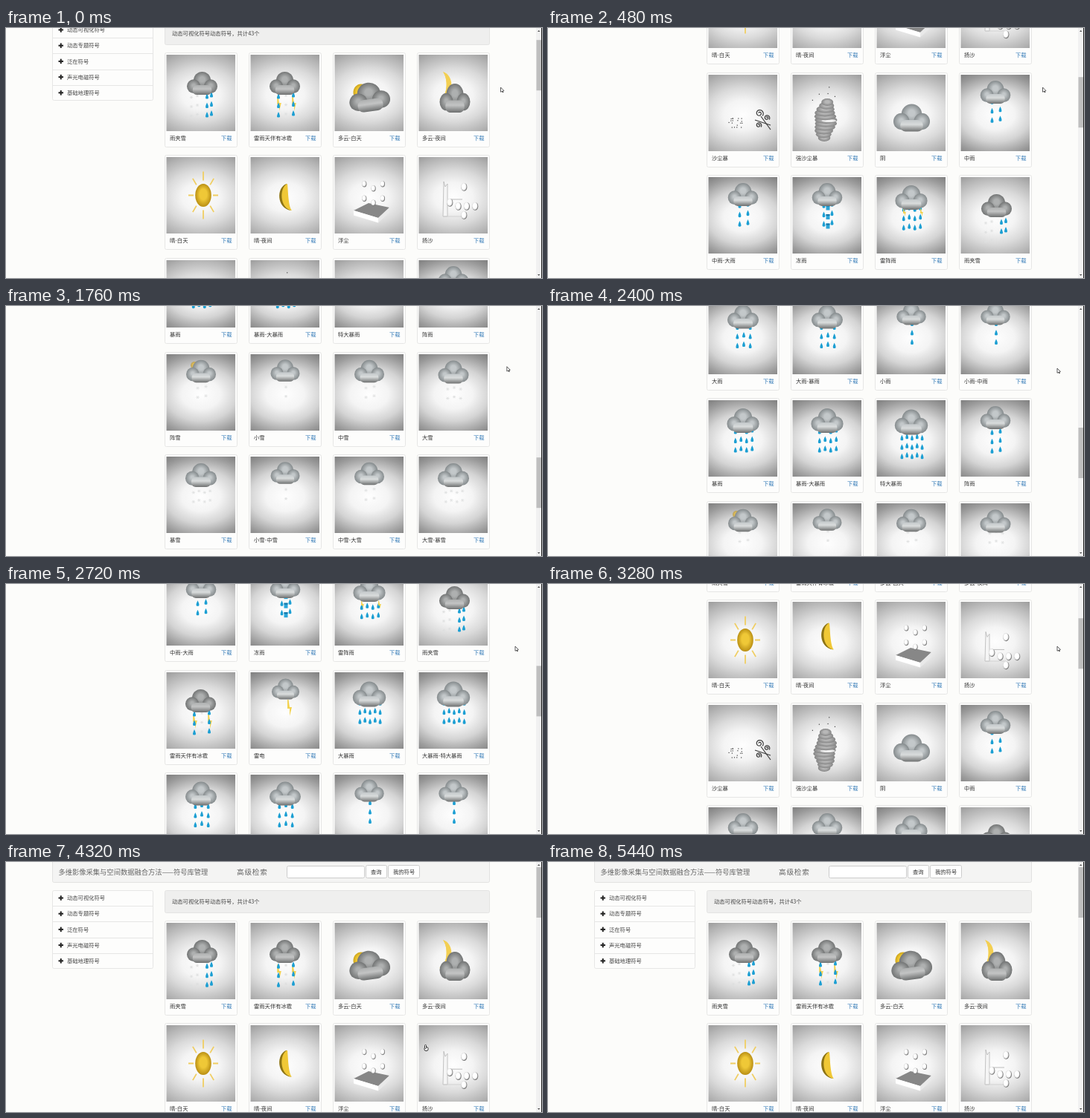
An HTML page with a canvas that plays this animation: 720x337 px, repeating every 5.52 s.

```html
<!DOCTYPE html>
<html lang="zh-CN">
<head>
<meta charset="utf-8">
<title>符号库管理</title>
<style>
  html, body { margin: 0; width: 100%; height: 100%; overflow: hidden; background: #fcfcfa; }
  canvas { display: block; }
</style>
</head>
<body>
<canvas id="stage" width="720" height="337"></canvas>
<script>
const ctx = document.getElementById('stage').getContext('2d');
const LOOP = 5520, TICK = 80, CYCLE = 1360;
const DROP_GAP = 12.5, COLUMN = 113, ROW = 138.4;
const FONT = '"Noto Sans CJK SC", "Noto Sans CJK", sans-serif';
// time, value(s)
const SCROLL = [[0, 46], [160, 148], [1040, 555], [1600, 986], [2160, 986],
  [2720, 517], [3280, 196], [3840, 0]];
const MOUSE = [[0, 664.5, 80], [1520, 664.5, 80], [2080, 684, 84], [4000, 684, 84],
  [4320, 561, 246], [4800, 540, 350]];
let now = 0;

// ---- helpers ----
function track(keys, item = 1) {
  const i = keys.findIndex(k => k[0] > now);
  if (i < 0) return keys.at(-1)[item];
  const a = keys[i - 1], b = keys[i];
  return a[item] + (b[item] - a[item]) * (now - a[0]) / (b[0] - a[0]);
}
const wave = () => Math.sin(Math.PI * now / CYCLE) ** 2;
const noise = n => Math.abs(Math.sin(n * 12.99) * 43758.5) % 1;
const repeat = (n, draw) => { for (let i = 0; i < n; i++) draw(i); };

function text(str, x, y, size = 7.3, color = '#444') {
  ctx.font = `${size}px ${FONT}`;
  ctx.fillStyle = color;
  ctx.fillText(str, x, y);
}
function box(x, y, w, h, fill, stroke, radius = 2) {
  ctx.beginPath();
  ctx.roundRect(x + .5, y + .5, w - 1, h - 1, radius);
  ctx.fillStyle = fill;
  ctx.fill();
  ctx.lineWidth = 1;
  ctx.strokeStyle = stroke;
  ctx.stroke();
}
function poly(points, fill, stroke) {
  ctx.beginPath();
  points.forEach(([x, y]) => ctx.lineTo(x, y));
  ctx.closePath();
  ctx.fillStyle = fill;
  ctx.fill();
  if (stroke) {
    ctx.strokeStyle = stroke;
    ctx.lineWidth = .8;
    ctx.stroke();
  }
}
function line(x1, y1, x2, y2, color, width) {
  ctx.beginPath();
  ctx.moveTo(x1, y1);
  ctx.lineTo(x2, y2);
  ctx.strokeStyle = color;
  ctx.lineWidth = width;
  ctx.stroke();
}
function ball(x, y, rx, ry, light, dark, mid = .45) {
  ctx.save();
  ctx.translate(x, y);
  ctx.scale(rx, ry);
  const g = ctx.createRadialGradient(0, -.15, 0, 0, 0, 1);
  g.addColorStop(mid, light);
  g.addColorStop(1, dark);
  ctx.fillStyle = g;
  ctx.beginPath();
  ctx.arc(0, 0, 1, 0, 7);
  ctx.fill();
  ctx.restore();
}

// ---- weather parts, in picture coordinates ----
function cloud(x, y, w, dark, h = w, tilt = 0) {
  const [light, edge, front] = dark ? ['#aeb0b0', '#737575', '#c3c4c4'] : ['#c3c8ca', '#858b8d', '#d9dcdc'];
  ctx.save();
  ctx.translate(x, y);
  ctx.rotate(tilt);
  ctx.scale(w, h);
  ball(0, -.1, .28, .28, light, edge, .3);
  ball(-.28, .1, .22, .23, light, edge, .2);
  ball(.28, .1, .22, .23, light, edge, .2);
  const g = ctx.createLinearGradient(0, .06, 0, .38);
  g.addColorStop(0, light);
  g.addColorStop(.4, front);
  g.addColorStop(1, '#6e7070');
  ctx.fillStyle = g;
  ctx.beginPath();
  ctx.roundRect(-.31, .06, .62, .32, .14);
  ctx.fill();
  ctx.restore();
}
function drop(x, y) {
  ctx.fillStyle = '#1c9fd3';
  ctx.beginPath();
  ctx.moveTo(x, y - 4);
  ctx.quadraticCurveTo(x + 4, y + 4, x, y + 3.6);
  ctx.quadraticCurveTo(x - 4, y + 4, x, y - 4);
  ctx.fill();
}
function flake(x, y) {
  repeat(3, i => {
    const dx = 2.2 * Math.cos(i * Math.PI / 3), dy = 2.2 * Math.sin(i * Math.PI / 3);
    line(x - dx, y - dy, x + dx, y + dy, '#dfe0e0', .8);
  });
}
function ice(x, y) {
  ctx.fillStyle = '#2aa5d8';
  ctx.fillRect(x - 2.5, y - 3.5, 5, 7);
  ctx.fillStyle = '#1676a8';
  ctx.fillRect(x - 2.5, y - 3.5, 5, 2);
}
function bolt(x, y, h) {
  const w = h * .1 + .8;
  poly([[x - w, y - h / 2], [x - w / 2, y - h / 2], [x, y - 1], [x + w, y - 1],
    [x, y + h / 2], [x, y + 1], [x - w, y + 1]], '#f3d250');
}
function fall(part, xs, top, phase, rows = 3) {
  const f = (phase + now / CYCLE) % 1;
  xs.forEach((x, i) => repeat(rows, k => part(x, top + (k + f) * DROP_GAP - i % 2 * 2)));
}
function crescent(x, y, h, bulge, inner, tip, color) {
  ctx.beginPath();
  ctx.moveTo(x, y);
  ctx.bezierCurveTo(x + bulge, y + h * .12, x + bulge, y + h * .92, x + tip, y + h);
  ctx.bezierCurveTo(x + inner, y + h * .85, x + inner, y + h * .25, x, y);
  ctx.fillStyle = color;
  ctx.fill();
}
function pearl(x, y, r) {
  ball(x + .4, y + .4, r, r * 1.35, '#999', '#777');
  ball(x - .2, y - .2, r - .3, r * 1.35 - .3, '#fff', '#e2e2e2', .6);
}
function specks(n, x, y, w, h) {
  ctx.fillStyle = '#444';
  repeat(n, i => ctx.fillRect(x + w * noise(i + 1), y + h * noise(i + 40), 1.2, 1.2));
}

// ---- pictures ----
const columns = n => Array.from({ length: n }, (_, i) => 47 + (i - (n - 1) / 2) * (4 + 14 / n));

// More columns of drops come with a larger, lower cloud.
const rain = (n, phase, extra) => () => {
  const y = 19.5 + 2 * n, w = 38 + 1.3 * n;
  fall(drop, columns(n), y + w * .38 - 6.5, phase);
  if (extra) extra();
  cloud(46, y, w);
};
const snow = (n, extra) => () => {
  const y = 21 + n, w = 38 + n;
  fall(flake, columns(n), y + w * .38, .3, 2);
  if (extra) extra();
  cloud(46, y, w);
};
const freezing = () => fall(ice, [47], 36, .05);
const flashes = () => [37, 60].forEach(x => bolt(x, 48, 11));
const hiddenSun = () => ball(37, 15, 5, 5, '#dfbd55', '#b8a060');

function sleet() {
  fall(flake, [33, 41], 50, .6);
  fall(drop, [54, 60], 46, .8);
  cloud(47.5, 38.5, 41, true);
}
function hail() {
  fall(flake, [47], 50, .4);
  [38, 58].forEach(x => bolt(x, 66, 20));
  fall(drop, [37, 57], 46, .8);
  cloud(45.5, 38.5, 41, true);
}
function cloudyDay() {
  ball(35, 51, 10.5, 11.5, '#f0c832', '#cda51c', .6);
  cloud(46, 57, 55, true, 51, -.14);
}
function cloudyNight() {
  crescent(32, 23, 38, 13, 7, -5, '#f3cf52');
  crescent(32, 23, 38, 16, 7, -5, '#f3cf52');
  cloud(48, 58.5, 41, true, 51);
}
function sun() {
  repeat(8, i => {
    const c = Math.cos(i * Math.PI / 4), s = Math.sin(i * Math.PI / 4);
    line(49 + c * 13, 51.5 + s * 20, 49 + c * 20, 51.5 + s * 32, '#f0ce62', 1.8);
  });
  ball(49, 51.5, 10.8, 15.6, '#efc837', '#b98f14');
}
function moon() {
  const y = 36 - 8 * wave();
  crescent(48, y, 36, -14, -2, 6, '#8d7415');
  crescent(49, y, 36, -11, 1, 6, '#f0c836');
}
function dust() {
  const back = [45, 62], left = [25, 72], front = [58, 82], right = [73, 68];
  const below = ([x, y]) => [x, y + 6.5];
  poly([left, back, right, front], '#878787');
  poly([left, front, below(front), below(left)], '#fff');
  poly([front, right, below(right), below(front)], '#e9e9e9');
  repeat(6, i => pearl(39 + i % 3 * 12.3, 36 + (i > 2) * 19.5 + (i % 3 === 1) * 6 - wave(), 3));
}
function blowingSand() {
  const y = 8 * wave();
  poly([[33, 33 + y], [35, 40 + y], [38, 36 + y], [38, 80], [32, 80]], '#f5f5f5', '#b5b5b5');
  line(32, 80, 60, 80, '#d2d2d2', 1);
  line(40, 57 + y, 58, 57 + y, '#bbb', 1);
  [40, 78].forEach(py => pearl(60, py + y, 4));
  repeat(4, i => pearl(41 + i * 11.3, (i ? 66 : 61) + y, 4));
}
function spiral(x, y, r) {
  ctx.beginPath();
  for (let a = 0; a < 10; a += .3) {
    const d = r * (1 - a / 12);
    ctx.lineTo(x + d * Math.cos(.7 - a), y + d * Math.sin(.7 - a));
  }
  ctx.strokeStyle = '#3b3b3b';
  ctx.lineWidth = 1.2;
  ctx.stroke();
}
function sandstorm() {
  specks(18, 26, 58, 20, 14);
  spiral(68, 52, 5.5);
  spiral(78, 58, 4);
  spiral(67, 68, 4);
  line(70, 56, 83, 74, '#3b3b3b', 1.2);
  line(62, 61, 83, 68, '#3b3b3b', 1.2);
}
function tornado() {
  repeat(11, k => {
    const i = 10 - k, w = 8 + 7 * Math.sin(i * .31);
    const x = 45 + Math.sin(i * 1.1 + now / 300) * 1.2 - i * .3;
    ball(x, 37 + i * 4.8, w, 5, '#b8b8b8', '#858585', .35);
    if (i === 5) ball(x + 4, 62, 10, 2, '#f4f4f4', '#ddd');
  });
  specks(5, 25, 15, 35, 45);
}
function lightning() {
  if (now % CYCLE < CYCLE / 2) bolt(52, 48, 22);
  else {
    line(44, 40, 43.5, 62, '#f1e7c0', 1.5);
    bolt(45.5, 67, 26);
  }
  cloud(46.5, 22.5, 37);
}
const overcast = () => cloud(46.5, 58, 49);

const CARDS = [
  ['雨夹雪', sleet], ['雷雨天伴有冰雹', hail], ['多云-白天', cloudyDay], ['多云-夜间', cloudyNight],
  ['晴-白天', sun], ['晴-夜间', moon], ['浮尘', dust], ['扬沙', blowingSand],
  ['沙尘暴', sandstorm], ['强沙尘暴', tornado], ['阴', overcast], ['中雨', rain(2, .95)],
  ['中雨-大雨', rain(2, .1)], ['冻雨', rain(2, .1, freezing)], ['雷阵雨', rain(4, .1, flashes)], ['雨夹雪', sleet],
  ['雷雨天伴有冰雹', hail], ['雷电', lightning], ['大暴雨', rain(5, .1)], ['大暴雨-特大暴雨', rain(5, .1)],
  ['大雨', rain(3, .6)], ['大雨-暴雨', rain(3, .6)], ['小雨', rain(1, .6)], ['小雨-中雨', rain(1, .6)],
  ['暴雨', rain(4, .6)], ['暴雨-大暴雨', rain(4, .6)], ['特大暴雨', rain(5, .1)], ['阵雨', rain(2, .1)],
  ['阵雪', snow(2, hiddenSun)], ['小雪', snow(1)], ['中雪', snow(2)], ['大雪', snow(3)],
  ['暴雪', snow(4)], ['小雪-中雪', snow(1)], ['中雪-大雪', snow(2)], ['大雪-暴雪', snow(4)]
];
const PALE = [sleet, hail, cloudyDay, cloudyNight, sun, moon, dust, blowingSand, sandstorm, tornado, overcast];
const MENU = ['动态可视化符号', '动态专题符号', '泛在符号', '声光电磁符号', '基础地理符号'];

// ---- page ----
function backdrop(pale) {
  ctx.save();
  ctx.translate(46, 54);
  ctx.scale(72, 55);
  const g = ctx.createRadialGradient(0, 0, 0, 0, 0, 1.2);
  g.addColorStop(0, '#fefefe');
  g.addColorStop(.3, '#f4f4f4');
  g.addColorStop(.55, pale ? '#dadada' : '#d4d4d4');
  g.addColorStop(.82, pale ? '#b4b4b4' : '#9a9a9a');
  g.addColorStop(1, pale ? '#989898' : '#7a7a7a');
  ctx.fillStyle = g;
  ctx.fillRect(-1, -1, 2, 2);
  ctx.restore();
}
function card([label, picture], x, y) {
  ctx.save();
  ctx.translate(x, y);
  box(-3, -3, 98, 128, '#fdfdfc', '#e6e6e5');
  text(label, 4, 112.5, 7.3, '#333');
  text('下载', 73, 112.5, 7.3, '#337ab7');
  ctx.beginPath();
  ctx.rect(-.5, 0, 92.5, 103);
  ctx.clip();
  backdrop(PALE.includes(picture));
  picture();
  ctx.restore();
}
function header() {
  box(62, -4, 588, 32, '#f4f4f3', '#e2e2e1');
  text('多维影像采集与空间数据融合方法——符号库管理', 70.5, 13, 9.27, '#666');
  ctx.letterSpacing = '.8px';
  text('高级检索', 310, 13, 9.6, '#666');
  ctx.letterSpacing = '0px';
  box(377, 5, 105, 17, '#fff', '#ccc');
  box(483, 4, 29, 18, '#fff', '#ccc');
  box(513, 4, 43, 18, '#fff', '#ccc');
  text('查询', 490, 13, 7.3, '#333');
  text('我的符号', 520, 13, 7.3, '#333');
}
function sidebar() {
  box(62, 38, 136, 106, '#fdfdfc', '#e6e6e5');
  MENU.forEach((label, i) => {
    const y = 48.5 + i * 21.2, rule = Math.round(y - 10.6) + .5;
    if (i) line(62, rule, 198, rule, '#e6e6e5', 1);
    line(70.5, y, 77, y, '#222', 2);
    line(73.75, y - 3.25, 73.75, y + 3.25, '#222', 2);
    text(label, 82, y);
  });
}
function scrollbar(scroll) {
  ctx.fillStyle = '#f1f1f1';
  ctx.fillRect(712, 0, 7, 337);
  ctx.fillStyle = '#bfbfbf';
  ctx.fillRect(712.5, 7 + scroll * .2, 6.5, 68);
  poly([[714, 5], [717.4, 5], [715.7, 3]], '#505050');
  poly([[714, 332], [717.4, 332], [715.7, 334]], '#505050');
  ctx.fillStyle = '#222';
  ctx.fillRect(719, 0, 1, 337);
}
function cursor(x, y) {
  const overCard = x > 555 && x < 647 && y > 82;
  if (overCard) {
    box(x + .5, y + 3, 6, 6, '#fff', '#333');
    box(x + 1, y, 3, 6, '#fff', '#333', 1);
  } else {
    line(x + 2, y + 4, x + 3.2, y + 7, '#333', 1.4);
    poly([[x, y], [x, y + 6.2], [x + 4.4, y + 4.5]], '#fff', '#333');
  }
}

function draw() {
  const tick = Math.floor(performance.now() % LOOP / TICK);
  now = TICK * (tick % 6 === 3 ? tick - 1 : tick);
  const scroll = track(SCROLL);

  ctx.textBaseline = 'middle';
  ctx.fillStyle = '#fcfcfa';
  ctx.fillRect(0, 0, 720, 337);
  ctx.save();
  ctx.translate(0, -Math.round(scroll));
  header();
  sidebar();
  box(213, 38, 437, 31, '#efefee', '#e3e3e2');
  text('动态可视化符号动态符号，共计43个', 223, 53.5);
  ctx.restore();
  CARDS.forEach((c, i) => {
    const y = Math.round(82 + Math.floor(i / 4) * ROW - scroll);
    if (y > -135 && y < 345) card(c, 216 + i % 4 * COLUMN, y);
  });
  scrollbar(scroll);
  cursor(track(MOUSE, 1), track(MOUSE, 2));
  requestAnimationFrame(draw);
}
draw();
</script>
</body>
</html>
```
